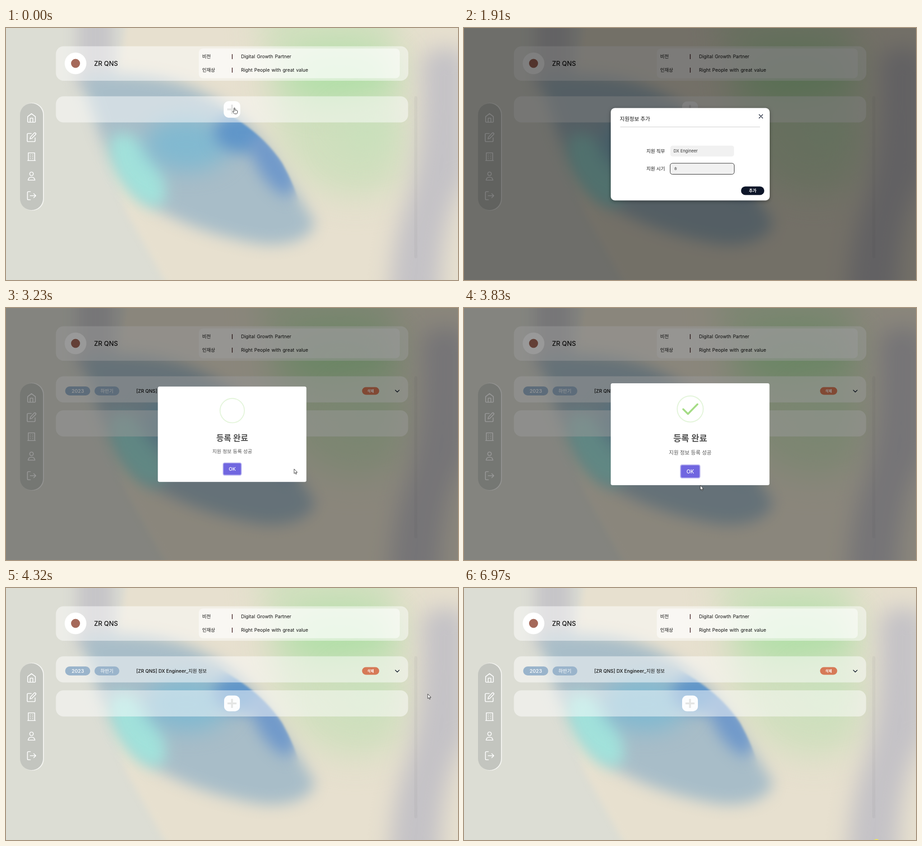
Animation of 1001 by 559 pixels, one loop 7.03 s. Source, as an HTML page:

```html
<!DOCTYPE html>
<html lang="ko">
<head>
<meta charset="utf-8">
<style>
html, body { margin: 0; width: 100%; height: 100%; overflow: hidden; background: #dcddd4 }
svg { position: absolute; left: 0; top: 0; will-change: transform }
text { font: 500 10.4px Inter, 'Noto Sans CJK KR', 'Noto Sans CJK', sans-serif; fill: #111; white-space: pre }
.mid { text-anchor: middle }
.white { fill: #fff }
.card { fill: #fff; fill-opacity: .48 }
.line { fill: none; stroke: #fff; stroke-width: 1.7; stroke-linecap: round; stroke-linejoin: round }
.dark { stroke: #0d1629; stroke-width: 1.5 }
.info { font-size: 10.5px; font-weight: 400; word-spacing: 1px }
.link { font-size: 9.8px; text-decoration: underline }
.field { font-size: 9.2px; font-weight: 400; fill: #333 }
.b2 { filter: blur(2px) }
.b8 { filter: blur(8px) }
.b16 { filter: blur(16px) }
.b24 { filter: blur(24px) }
.b36 { filter: blur(36px) }
#modal > rect:first-child { filter: drop-shadow(0 2px 4px rgba(0,0,0,.35)) }
</style>
</head>
<body>
<svg width="1001" height="559">
  <clipPath id="edge"><path d="M360 90L480 183Q570 235 612 300Q640 350 655 405L560 430L330 330Z"/></clipPath>
  <rect width="1001" height="559" fill="#dcddd4"/>
  <path class="b8" fill="#e7e0cf" d="M275-60H1060V620H385L265 405L215 260Z"/>
  <rect class="b16" fill="#c6c5c8" x="158" y="-60" width="80" height="190"/>
  <path class="b36" fill="#d0dfbe" d="M560-60H860L880 330Q780 420 660 330L600 250Z"/>
  <ellipse class="b36" fill="#b2dfa8" cx="740" cy="105" rx="125" ry="60"/>
  <ellipse class="b36" fill="#c8e0bb" cx="800" cy="230" rx="65" ry="50"/>
  <path class="b24" fill="#c4c2c6" d="M920 70Q960 20 1020 60V330Q960 420 960 620H850Q850 480 890 380Q930 250 920 70Z"/>
  <path class="b16" fill="#a8bdc8" d="M165 105Q330 90 430 140Q545 195 600 300Q655 380 685 435Q660 485 570 480Q440 460 340 405Q250 330 210 240Z"/>
  <ellipse class="b16" fill="#a2e2db" cx="292" cy="315" rx="45" ry="92" transform="rotate(-32 292 315)"/>
  <ellipse class="b24" fill="#82b9d0" cx="400" cy="258" rx="95" ry="60"/>
  <g class="b2"><g clip-path="url(#edge)">
    <ellipse class="b16" fill="#6096c9" cx="522" cy="232" rx="62" ry="45"/>
    <ellipse class="b16" fill="#7099ca" cx="592" cy="302" rx="34" ry="80" transform="rotate(-32 592 302)"/>
  </g></g>
  <rect x="904" y="151" width="7" height="360" rx="3.5" fill-opacity=".03"/>
</svg>

<svg width="1001" height="559">
  <defs>
    <clipPath id="fold"><rect id="foldBox" x="110" y="151" width="781" height="58"/></clipPath>
  </defs>

  <rect class="card" x="110.5" y="40.5" width="780.5" height="76.5" rx="17"/>
  <rect x="427" y="45.5" width="445" height="66" rx="9" fill="#fff" fill-opacity=".5"/>
  <circle cx="154" cy="78.5" r="24" fill="#fff"/>
  <circle cx="154" cy="78.5" r="10" fill="#a5695a"/>
  <text x="195" y="83.5" style="font-size:14.2px">ZR QNS</text>
  <text x="434.5" y="67">비전</text>
  <text x="434.5" y="97">인재상</text>
  <path d="M501 58V69M501 88V99" stroke="#402020" stroke-width="1.5"/>
  <text class="info" x="520.5" y="67">Digital Growth Partner</text>
  <text class="info" x="520.5" y="97">Right People with great value</text>

  <g id="job">
    <rect id="jobCard" class="card" x="110.5" y="151.5" width="780" height="58" rx="17"/>
    <g id="jobRow">
      <rect x="131" y="174" width="55.5" height="20" rx="10" fill="#9ab4cb"/>
      <rect x="196" y="174" width="55" height="20" rx="10" fill="#9ab4cb"/>
      <text class="mid white" x="159" y="188" style="font-size:11px">2023</text>
      <text class="mid white" x="223.5" y="188">하반기</text>
      <text x="288.5" y="188">[ZR QNS] DX Engineer_지원 정보</text>
      <rect x="788.5" y="175.5" width="38" height="17" rx="8.5" fill="#d67a57"/>
      <text class="mid white" x="807.5" y="187" style="font-size:7.8px;font-weight:700">삭제</text>
      <path id="chevron" class="line dark" d="M862.2 182.2L866.5 186.5L870.8 182.2"/>
    </g>
    <g id="details" clip-path="url(#fold)">
      <text x="140" y="233.5" style="font-size:11.7px">자기소개서</text>
      <path class="line dark" style="stroke-width:1.1" d="M204.5 223.5L209.5 228L204.5 232.5V230Q200 229.800 198.500 234Q198 226.500 204.500 226Z"/>
      <rect x="137" y="244.500" width="705" height="34" rx="6" fill-opacity=".18"/>
      <rect x="137" y="243.500" width="705" height="34" rx="6" fill="#f8fafa"/>
      <rect x="137" y="298.500" width="705" height="34" rx="6" fill-opacity=".18"/>
      <rect x="137" y="297.500" width="705" height="34" rx="6" fill="#f8fafa"/>
      <text class="mid link" x="489.5" y="264.500">자기소개서 작성하러 가기 →</text>
      <text class="mid link" x="489.5" y="318.500">면접 준비하러 가기 →</text>
      <rect x="864" y="210" width="7" height="130" rx="3.500" fill-opacity=".05"/>
    </g>
  </g>

  <g id="adder">
    <rect class="card" x="110.5" y="151.5" width="780" height="58" rx="17"/>
    <g id="plus">
      <rect x="483" y="163" width="35" height="35" rx="11" fill="#fff" fill-opacity=".96"/>
      <path d="M490.500 180.500H510.500M500.500 170.500V190.500" stroke="#e4e5e4" stroke-width="4"/>
    </g>
  </g>

  <rect x="32.5" y="166" width="51.500" height="239" rx="26" fill="#fff" fill-opacity=".7"/>
  <rect x="31" y="167" width="51" height="237" rx="25.500" fill="#c3c5bf"/>
  <g class="line">
    <path d="M48 196.500L56.500 190L65 196.500V207.500Q65 209 63.500 209H49.500Q48 209 48 207.500ZM53.500 209V200H59.500V209"/>
    <path d="M56 234H49Q47 234 47 236V250Q47 252 49 252H62.500Q64.500 252 64.500 250V243.500M62.500 233Q64 231.800 65.500 233.200T65.700 236.200L57 245L53.200 246L54.200 242Z"/>
    <path d="M49.500 294V277H63.500V294M48 294H65"/>
    <path d="M54 281.500h.1M59 281.500h.1M54 285.500h.1M59 285.500h.1M54 289.500h.1M59 289.500h.1"/>
    <circle cx="56.500" cy="323.500" r="4"/>
    <path d="M49 337.500Q49.500 331 56.500 331T64 337.500Z"/>
    <path d="M54 363H49.500Q47.500 363 47.500 365V379Q47.500 381 49.500 381H54M53.500 372H65.500M61.500 367.500L66 372L61.500 376.500"/>
  </g>

  <rect id="dim" width="1001" height="559"/>

  <g id="modal">
    <rect x="325" y="177.500" width="352" height="205" rx="9" fill="#fff"/>
    <text x="345" y="205.500" style="font-size:11.6px">지원정보 추가</text>
    <path class="line dark" style="stroke-width:1.300" d="M653.500 192L661.500 200M661.500 192L653.500 200"/>
    <path d="M346 219.500H655.500" stroke="#cacaca"/>
    <text x="404" y="276.500">지원 직무</text>
    <text x="404" y="316">지원 시기</text>
    <rect x="457" y="261" width="141" height="24" rx="5" fill="#f1f1f1"/>
    <rect x="457" y="300.500" width="141" height="23.500" rx="5" fill="#f1f1f1"/>
    <rect id="focus" x="456.500" width="142" height="24.500" rx="5" fill="none" stroke="#222"/>
    <text id="role" class="field" x="464" y="276"></text>
    <text id="season" class="field" x="464" y="316" style="font-size:9.8px"></text>
    <rect id="submit" x="613.500" y="351.500" width="51.500" height="19" rx="9.500"/>
    <text class="mid white" x="639.300" y="364.300" style="font-size:9px;font-weight:700">추가</text>
  </g>

  <g id="alert">
    <rect x="325" y="167" width="351.500" height="226" rx="4" fill="#fff"/>
    <circle cx="501" cy="224" r="28.800" fill="none" stroke="#e4f5db" stroke-width="2.300"/>
    <path id="check" class="line" pathLength="1" stroke-dasharray="1 2" style="stroke:#a5dc86;stroke-width:4" d="M485.500 224.500L496 235L517 213.500"/>
    <text class="mid" x="501" y="296" style="font-size:19.2px;font-weight:700;fill:#545454">등록 완료</text>
    <text class="mid" x="501" y="325" style="font-size:11.500px;font-weight:400;fill:#545454">지원 정보 등록 성공</text>
    <rect x="478.500" y="347" width="45" height="31" rx="4.500" fill="#b7b2ef"/>
    <rect id="ok" x="480.500" y="349" width="41" height="27" rx="3"/>
    <text class="mid white" x="501" y="366.500" style="font-size:11.500px">OK</text>
  </g>

  <circle id="spot" cx="913.500" cy="565.600" r="8.600" fill="#f0ea55"/>
  <path id="cursor" stroke-linejoin="round" stroke-width=".9"/>
</svg>

<script>
const LOOP = 7030;
const $ = id => document.getElementById(id);
const set = (id, attrs) => { for (const k in attrs) $(id).setAttribute(k, attrs[k]); };
const show = (id, on) => { $(id).style.display = on ? '' : 'none'; };
const ramp = (t, a, b) => Math.min(1, Math.max(0, (t - a) / (b - a)));
const mix = (a, b, k) => a + (b - a) * k;
const zoom = (s, x, y) => `translate(${x} ${y}) scale(${s}) translate(${-x} ${-y})`;

const OPEN = 450, SAVED = 3140, CLOSE = 4180;

const shapes = {
  arrow: 'M0 0V10.200L2.400 8.200L4 11.800L5.600 11L4.100 7.600H7.200Z',
  hand: 'M-1 1.200Q-1 0 0 0T1 1.200V5L5.500 6Q7 6.400 6.800 8L6 12Q5.600 13.500 4.400 13.500H.5Q-.6 13.400-1.400 12L-3.800 8.600Q-4 7.300-2.700 7.400L-1 8.600Z',
  beam: 'M-2.500-5Q-.5-5 0-4Q.5-5 2.500-5M0-4V4M-2.500 5Q-.5 5 0 4Q.5 5 2.500 5'
};

// time, x, y, shape
const path = [
  [0, 506, 177, 'hand'], [60, 506, 177, 'hand'], [200, 503, 172, 'hand'],
  [OPEN, 506, 262, 'beam'], [520, 506, 268, 'beam'], [590, 506, 268, 'beam'], [790, 507, 271, 'beam'],
  [1320, 507, 271, ''], [2520, 507, 271, 'beam'], [2600, 520, 286, 'arrow'],
  [2960, 638, 357, 'arrow'], [3300, 638, 357, 'arrow'], [3820, 525, 396, 'arrow'],
  [3960, 503, 364, 'hand'], [CLOSE, 502, 366, 'arrow'], [4320, 934, 235, 'arrow'],
  [4400, 934, 235, 'arrow'], [4700, 880, 190, 'arrow'], [4860, 866, 178, 'hand'],
  [5000, 866.5, 182, 'hand'], [6160, 866.5, 182, 'arrow'], [6620, 884, 556, '']
];

const syllables = [[1910, 'ㅎ'], [1980, '하'], [2050, '하바'], [2190, '하반'], [2250, '하반기']];

function drawCursor(t) {
  const i = path.findLastIndex(p => p[0] <= t);
  const a = path[i], b = path[i + 1] || a;
  const jump = b[0] === OPEN;
  const k = jump ? 0 : ramp(t, a[0], b[0]);
  const beam = a[3] === 'beam';
  show('cursor', a[3]);
  if (a[3]) set('cursor', {
    d: shapes[a[3]],
    transform: `translate(${mix(a[1], b[1], k)} ${mix(a[2], b[2], k)})`,
    fill: beam ? 'none' : '#fff',
    stroke: '#222'
  });
}

function popScale(p) {
  if (p < .45) return mix(.7, 1.05, p / .45);
  if (p < .8) return mix(1.05, .95, (p - .45) / .35);
  return mix(.95, 1, (p - .8) / .2);
}

function draw(t) {
  const modal = t >= OPEN && t < SAVED;
  const saved = t >= SAVED;
  const fold = ramp(t, 5180, 5340) - ramp(t, 6130, 6290);

  show('job', saved);
  set('jobCard', { height: 58 + 146 * fold });
  set('foldBox', { height: 58 + 146 * fold });
  set('jobRow', { transform: `translate(0 ${-3.5 * fold})` });
  set('chevron', { transform: `rotate(${180 * fold} 866.5 184.300)` });
  show('details', fold > 0);
  set('adder', { transform: `translate(0 ${saved ? 75.5 + 146 * fold : 0})` });
  set('plus', { transform: zoom(t < OPEN ? 1.05 : 1, 500.5, 180.5) });

  const hide = ramp(t, CLOSE, CLOSE + 120);
  set('dim', { opacity: modal ? .5 : .4 * ramp(t, SAVED, SAVED + 90) * (1 - hide) });

  show('modal', modal);
  $('role').textContent = 'DX Engineer'.slice(0, Math.ceil(11 * ramp(t, 1310, 1650)));
  $('season').textContent = (syllables.findLast(s => s[0] <= t) || [0, ''])[1];
  show('focus', t >= 780 && t < 2950);
  set('focus', { y: t < 1710 ? 260.5 : 300 });
  set('submit', { fill: t >= 2900 ? '#3b4459' : '#0d1629' });

  show('alert', saved && hide < 1);
  set('alert', {
    transform: zoom(popScale(ramp(t, SAVED, SAVED + 300)) * (1 - .5 * hide), 501, 280),
    opacity: 1 - hide
  });
  const tick = ramp(t, SAVED + 380, SAVED + 680);
  set('check', { 'stroke-dashoffset': 1 - tick, opacity: tick > 0 ? 1 : 0 });
  set('ok', { fill: t >= 4030 ? '#655cca' : '#7066e0' });

  show('spot', t >= 6970);
  drawCursor(t);
}

const start = performance.now();
function tick() {
  draw((performance.now() - start) % LOOP);
  requestAnimationFrame(tick);
}
tick();
</script>
</body>
</html>
```
